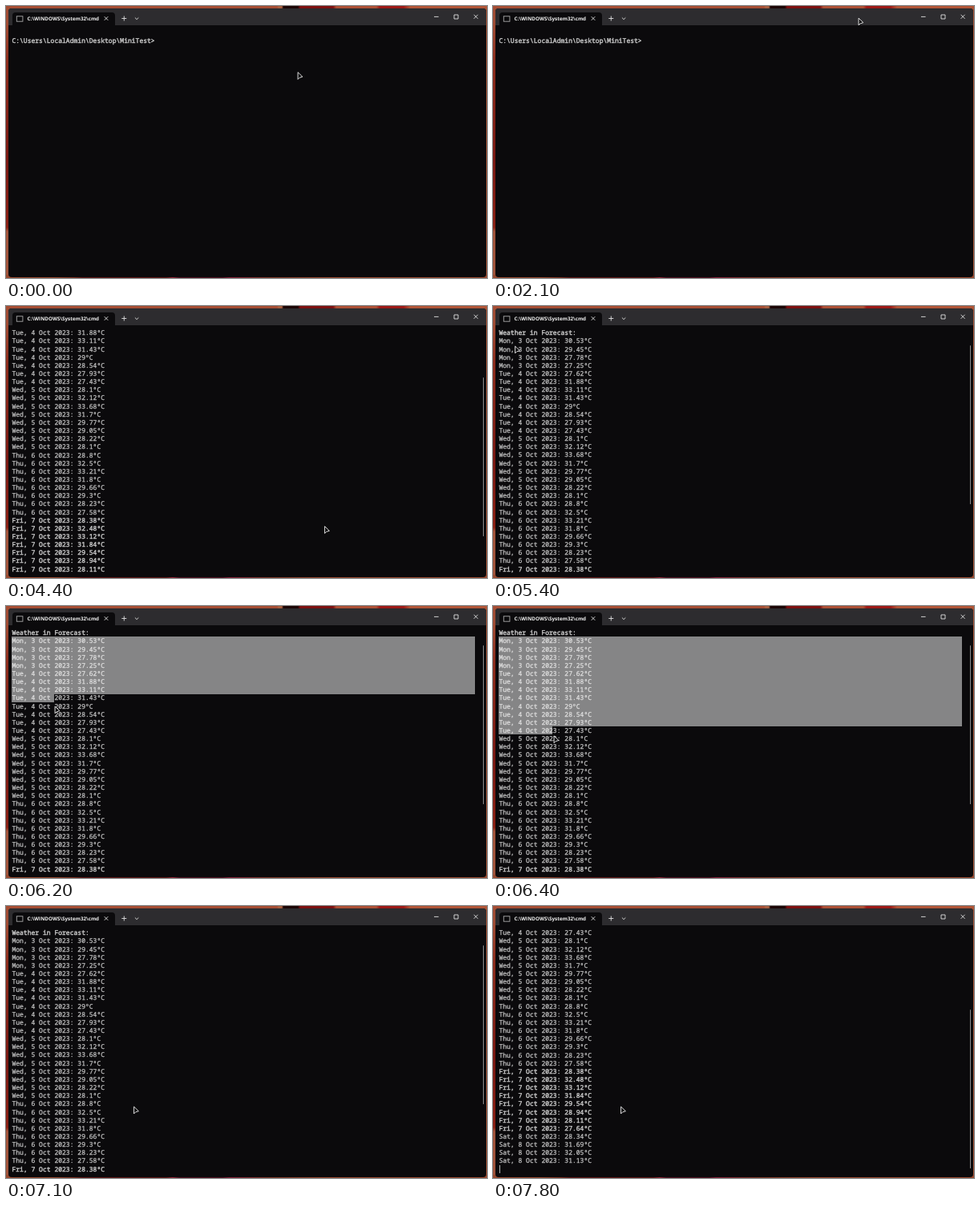
These frames come from a looping animation (600x339 px, 8000 ms). An HTML page:

```html
<!DOCTYPE html>
<html lang="en">
<head>
<meta charset="utf-8">
<title>Terminal</title>
<style>
  html, body { margin: 0; width: 100%; height: 100%; overflow: hidden; }
  #stage {
    position: relative; width: 600px; height: 339px; overflow: hidden;
    background:
      linear-gradient(90deg, #a54d33 0 338px, #a86040 340px 344px, #1c0606 346px 364px, #7c1010 367px 408px, #ac5035 412px 462px, #9c1a16 466px 496px, #b05537 504px) 0 0 / 600px 4px no-repeat,
      linear-gradient(90deg, #96492f 0 60px, #7c3020 85px, #601816 95px 200px, #9a283a 208px, #501020 216px 270px, #86203a 278px, #7c3a2a 330px, #9a4a30 400px) 0 335px / 600px 4px no-repeat,
      linear-gradient(#a04c34 0 20px, #8c2c1c 70px, #7a1812 190px, #8a2014 276px, #a0533a 281px) 0 0 / 4px 339px no-repeat,
      #a85538;
  }
  #stage * { position: absolute; box-sizing: border-box; }
  #win { left: 3px; top: 3px; width: 595.5px; height: 334.5px; border-radius: 4px; background: #0b0a0c; overflow: hidden; }
  #bar { left: 0; top: 0; width: 100%; height: 21px; background: #2d2c2f; }
  #tab { left: 5px; top: 4.5px; width: 128px; height: 17px; border-radius: 4px 4px 0 0; background: #0b0a0c; }
  #name { left: 26.6px; top: 10.4px; font: 700 6.3px/12px "Open Sans", sans-serif; color: #f2f2f2; white-space: pre; text-rendering: geometricPrecision; }
  #view { left: 0; top: 28.35px; width: 600px; height: 305px; overflow: hidden; }
  #rows { left: 7.4px; }
  #rows div {
    left: 0; white-space: pre; color: #c6c6c6; text-rendering: geometricPrecision;
    font: 500 8.04px/10.15px "Noto Sans Mono", "DejaVu Sans Mono", monospace;
    -webkit-text-stroke: .25px #c6c6c6;
  }
  #rows .strong { -webkit-text-stroke-width: .42px; }
  #caret { background: #b4b4b4; }
  .sel { background: rgba(255, 255, 255, .5); }
  #thumb { left: 594.6px; width: 1.2px; height: 198px; border-radius: 1px; background: #8c8c8c; }
  svg { left: 0; top: 0; }
</style>
</head>
<body>
<div id="stage">
  <div id="win"><div id="bar"></div><div id="tab"></div></div>
  <div id="name">C:\WINDOWS\System32\cmd</div>
  <div id="view">
    <div id="rows"></div>
    <div id="caret"></div>
    <div class="sel" id="selFull"></div>
    <div class="sel" id="selPart"></div>
  </div>
  <div id="thumb"></div>
  <svg width="600" height="339" fill="none" stroke="#e0e0e0" stroke-width=".9">
    <rect x="13.3" y="12.8" width="7.6" height="6.4" fill="#0b0a0c" stroke="#a8a8a8"/>
    <path d="M122.7 13.2l4.6 4.6m0-4.6l-4.6 4.6M144.3 15.5h6M147.3 12.5v6M160.9 14.5l2.2 2.2 2.2-2.2"/>
    <path d="M534 13.4h5.6M559 11h5v5h-5zM583.6 10.8l5 5m0-5l-5 5"/>
    <path id="mouse" d="M.6.6V9.4L2.7 7.3 6.4 6.2Z" fill="#0b0a0c" stroke="#f4f4f4" stroke-linejoin="round"/>
  </svg>
</div>
<script>
const $ = id => document.getElementById(id);
const LOOP = 8000, STEP = 100;
const CW = 4.82, RH = 10.15, LEFT = 7, TOP = 28.35, COLS = 120;
const BOTTOM = 15, END_ROW = 44; // furthest scroll and the last buffer row
const RUN = 3300, DRAG = 6000, RELEASE = 6700, RETURN = 7400;

const prompt = "C:\\Users\\LocalAdmin\\Desktop\\MiniTest>";
const command = "py WeatherForecast.py";
const forecast = {
  "Mon, 3": "30.53 29.45 27.78 27.25",
  "Tue, 4": "27.62 31.88 33.11 31.43 29 28.54 27.93 27.43",
  "Wed, 5": "28.1 32.12 33.68 31.7 29.77 29.05 28.22 28.1",
  "Thu, 6": "28.8 32.5 33.21 31.8 29.66 29.3 28.23 27.58",
  "Fri, 7": "28.38 32.48 33.12 31.84 29.54 28.94 28.11 27.64",
  "Sat, 8": "28.34 31.69 32.05 31.13"
};
const keyTimes = [-700, 2200, 2500, 3000, RETURN]; // each restarts the caret blink
const moves = [ // pointer: from, to, x, y
  [900, 1500, 455.5, 14.5],
  [4000, 4300, 397, 274],
  [4700, 5400, 27, 49.5],
  [5400, 5700, 9, 44],
  [5900, 6200, 60.5, 124.5],
  [6200, RELEASE, 98, 216.5],
  [6800, 7000, 159, 249.5]
];

const clamp = (v, lo, hi) => Math.min(hi, Math.max(lo, v));

function pointer(t) {
  let x = 363.5, y = 82;
  for (const [from, to, tx, ty] of moves) {
    const p = clamp((t - from) / (to - from), 0, 1);
    x += (tx - x) * p;
    y += (ty - y) * p;
  }
  return [x, y];
}

function scrollRow(t) {
  if (t < RUN) return 0;
  if (t < RETURN) return clamp(BOTTOM - 3 * (t - 4200) / STEP, 3, BOTTOM);
  return Math.min(BOTTOM, 9 + 6 * (t - RETURN) / STEP);
}

// The selection trails the pointer slightly and stays put after release.
function selection(t) {
  if (t < DRAG || t > 7000) return [0, 0];
  const [x, y] = pointer(Math.min(t, RELEASE) - 20);
  return [Math.floor((y - TOP) / RH), Math.ceil((x - LEFT) / CW)];
}

function addRow(index, text, strong) {
  const row = document.createElement("div");
  row.textContent = text;
  row.style.top = index * RH + "px";
  row.classList.toggle("strong", strong);
  $("rows").append(row);
  return row;
}

function place(el, x, y, w, h) {
  Object.assign(el.style, { left: x + "px", top: y + "px", width: w + "px", height: h + "px" });
}

const show = (el, on) => el.style.visibility = on ? "visible" : "hidden";

const input = addRow(1, prompt, true);
const output = [addRow(3, "Weather in Forecast:", true)];
for (const [day, temps] of Object.entries(forecast))
  for (const temp of temps.split(" "))
    output.push(addRow(output.length + 3, `${day} Oct 2023: ${temp}ºC`, day.startsWith("Fri")));

function draw(t) {
  const top = scrollRow(t), done = t >= RUN;
  const typed = t < 2200 ? 0 : t < 2500 ? 3 : command.length;
  input.textContent = prompt + command.slice(0, typed);
  output.forEach(row => show(row, done));
  $("rows").style.top = .9 - top * RH + "px";
  show($("thumb"), done);
  $("thumb").style.top = 28.5 + top * 100 / BOTTOM + "px";

  const entered = t >= 3000;
  const row = done ? END_ROW : entered ? 2 : 1;
  const col = entered ? 0 : prompt.length + typed;
  const lastKey = keyTimes.filter(k => k <= t).pop();
  place($("caret"), LEFT + col * CW + .5, (row - top) * RH, 1, RH);
  show($("caret"), (t - lastKey) % 1100 < 600);

  const [end, chars] = selection(t);
  place($("selFull"), LEFT, RH, COLS * CW, Math.max(0, end - 1) * RH);
  place($("selPart"), LEFT, end * RH, chars * CW, RH);

  $("mouse").setAttribute("transform", `translate(${pointer(t)})`);
  show($("mouse"), t < 2900 || t >= 4000);
}

const start = performance.now();
let last = -1;
function tick() {
  const t = Math.floor((performance.now() - start) % LOOP / STEP) * STEP;
  if (t !== last) draw(last = t);
  requestAnimationFrame(tick);
}
tick();
</script>
</body>
</html>
```
